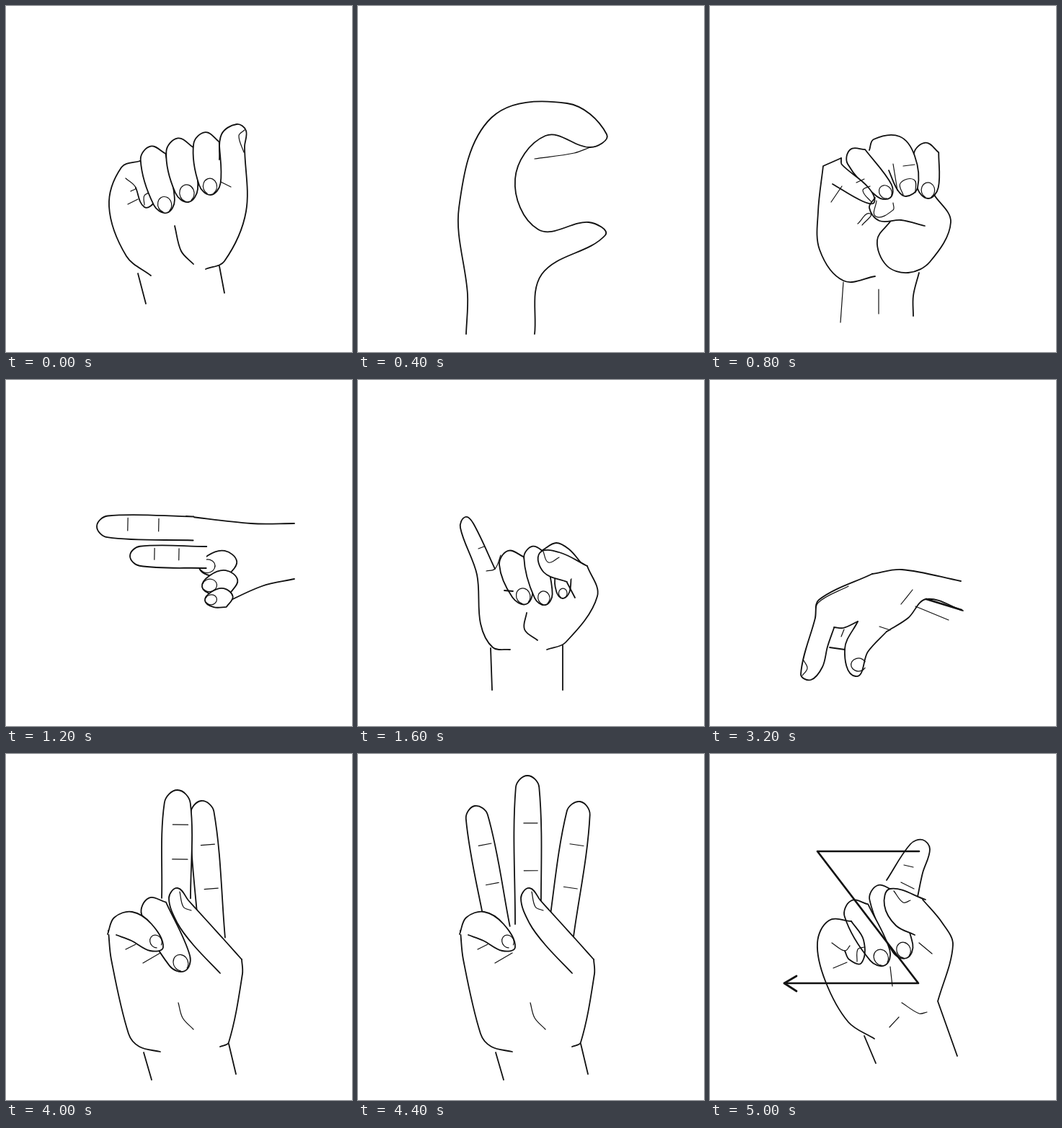
Animation of 480 by 480 pixels, one loop 5200 ms. Source, as an HTML page with a canvas:

```html
<!DOCTYPE html>
<html lang="en">
<head>
<meta charset="utf-8">
<title>Hand alphabet</title>
<style>
html, body { margin: 0; width: 100%; height: 100%; overflow: hidden; background: #fff; }
canvas { display: block; width: 100vw; height: 100vh; }
</style>
</head>
<body>
<canvas id="stage" width="480" height="480"></canvas>
<script>
const LETTER_MS = 200;
const ctx = document.getElementById('stage').getContext('2d');
ctx.lineCap = ctx.lineJoin = 'round';
ctx.strokeStyle = '#111';
ctx.fillStyle = '#fff';

// Smooth curve through the points; a repeated point makes a corner.
function curve(xy, width, filled) {
  const count = xy.length / 2;
  const at = i => {
    const k = Math.max(0, Math.min(count - 1, i)) * 2;
    return [xy[k], xy[k + 1]];
  };
  const handle = (i, reach) => {
    const [ax, ay] = at(i - 1), [bx, by] = at(i + 1), [x, y] = at(i);
    const scale = reach / (Math.hypot(bx - ax, by - ay) || 1);
    return [x + (bx - ax) * scale, y + (by - ay) * scale];
  };
  ctx.beginPath();
  ctx.moveTo(...at(0));
  for (let i = 0; i < count - 1; i++) {
    const [x0, y0] = at(i), [x1, y1] = at(i + 1);
    const reach = Math.hypot(x1 - x0, y1 - y0) / 3;
    ctx.bezierCurveTo(...handle(i, reach), ...handle(i + 1, -reach), x1, y1);
  }
  if (filled) ctx.fill();
  ctx.lineWidth = width;
  ctx.stroke();
}

const line = (...xy) => curve(xy, 1.8);
const thin = (...xy) => curve(xy, 1.2);
const bold = (...xy) => curve(xy, 2.7);
const shape = (...xy) => curve(xy, 1.8, true);

function nail(x, y, r, angle = 0) {
  ctx.beginPath();
  ctx.ellipse(x, y, r * 1.15, r, angle, .5, 5.8);
  ctx.lineWidth = 1.2;
  ctx.stroke();
}

// Run a drawing in coordinates along a finger: base at 0,0, tip at length,0.
function along(x0, y0, x1, y1, draw) {
  ctx.save();
  ctx.translate(x0, y0);
  ctx.rotate(Math.atan2(y1 - y0, x1 - x0));
  draw(Math.hypot(x1 - x0, y1 - y0));
  ctx.restore();
}

function finger(x0, y0, x1, y1, w) {
  along(x0, y0, x1, y1, length => {
    const r = w * .45, bend = length - r;
    shape(0, -w / 2, bend, -r, length, 0, bend, r, 0, w / 2);
    for (const t of [.36, .68]) thin(length * t, -w * .15, length * t, w * .38);
  });
}

function curl(x0, y0, x1, y1, w) {
  along(x0, y0, x1, y1, length => {
    const r = w * .45, h = w * .54, bend = length - r;
    shape(0, -h, bend, -r, length, 0, bend, r, 0, h, -r, 0, 0, -h);
    nail(length - w * .36, 0, w * .29);
  });
}

// Parts shared by several hands
function palm() {
  line(142,245, 146,285, 170,388, 185,406, 214,413);
  line(327,285, 328,305, 309,400, 297,406);
  thin(239,345, 245,366, 260,382);
  line(191,414, 202,452);
  line(309,402, 319,444);
}
function foldPinky() {
  shape(141,250, 150,227, 175,219, 202,236, 218,268, 200,273, 174,259, 153,251);
  nail(208,260, 8, 1);
  thin(166,271, 180,264);
  thin(190,290, 214,276);
}
function foldThumb() {
  shape(327,285, 302,257, 253,203, 238,186, 226,200, 238,235, 260,265, 297,304);
  thin(241,191, 246,212, 257,217);
}
function folded() {
  palm();
  curl(205,214, 248,301, 35);
  foldPinky();
  foldThumb();
}
function lowCurls() {
  curl(166,235, 195,285, 34);
  curl(196,217, 215,290, 35);
  curl(234,210, 243,292, 36);
}
function outThumb() {
  finger(300,314, 386,238, 35);
  line(286,250, 291,298);
}
function middleKnuckle() {
  shape(222,205, 230,184, 246,177, 268,198, 268,222);
}
function sideArm() {
  line(400,199, 340,199, 250,189);
  line(400,276, 355,286, 300,311);
  curl(306,254, 268,260, 32);
  curl(308,280, 272,287, 30);
  curl(304,302, 276,306, 24);
}
function reachArm() {
  line(348,279, 266,263, 225,269);
  line(245,349, 275,330, 300,304, 351,320);
  bold(300,304, 349,319);
  thin(265,311, 281,291);
  thin(285,314, 331,333);
}
function pinkyUp() {
  line(190,262, 160,199, 149,190, 142,205, 165,270, 170,338, 187,371, 211,374);
  thin(167,234, 175,231);
  thin(178,265, 190,262, 198,243);
  curl(213,251, 233,311, 33);
  curl(245,243, 260,312, 28);
  curl(285,272, 284,303, 20);
  line(203,292, 215,293);
  shape(318,258, 279,239, 252,240, 258,267, 290,280);
  thin(257,238, 264,253, 279,246);
  line(256,236, 275,226, 293,235, 309,253);
  line(290,281, 301,302);
  line(318,258, 332,300, 288,364, 262,374);
  line(234,323, 231,346, 249,361);
  line(184,372, 186,430);
  line(284,368, 284,430);
}
function draped() {
  line(117,408, 138,335, 177,261, 177,261, 222,237, 280,262, 288,295, 277,338);
  line(168,304, 178,294, 191,289, 228,325, 236,340, 254,342, 243,313, 217,275);
  nail(243,334, 8);
  thin(217,312, 228,307);
  line(217,275, 241,283, 235,289, 255,317);
  thin(241,281, 252,296, 256,312);
  line(247,279, 256,310, 257,343, 277,338);
  nail(267,335, 10);
  line(234,238, 262,226, 325,274, 322,318, 303,356, 278,346);
  nail(291,350, 9);
  thin(326,274, 324,308);
  thin(289,283, 291,303);
  thin(262,273, 272,272);
  thin(302,279, 313,277);
  line(168,376, 208,372, 221,361);
  line(252,375, 279,358);
  thin(214,374, 181,423);
  thin(256,373, 226,435);
}

const hands = {};

hands.A = () => {
  line(186,215, 203,232, 206,270, 192,279, 180,252);
  thin(192,276, 192,263, 204,257);
  thin(166,239, 180,252, 173,257);
  thin(169,275, 183,268);
  curl(204,209, 223,287, 33);
  curl(241,199, 253,272, 35);
  curl(278,190, 284,262, 33);
  line(296,213, 299,178, 320,164, 333,173, 331,195, 333,285, 303,354, 277,365);
  thin(331,172, 323,180, 330,203);
  thin(298,244, 312,251);
  line(186,215, 160,224, 143,278, 167,347, 201,374);
  line(234,305, 243,340, 260,358);
  line(183,371, 194,413);
  line(296,361, 303,398);
};

hands.B = () => {
  palm();
  finger(161,250, 154,110, 30);
  finger(194,240, 190,46, 34);
  finger(231,236, 234,20, 36);
  finger(268,240, 275,48, 35);
  line(285,238, 300,262, 327,285);
  shape(327,285, 285,285, 228,305, 222,326, 297,330);
};

hands.C = () => {
  line(150,455, 152,400, 140,280, 185,155, 290,135, 345,178, 322,196, 260,180,
    218,240, 250,310, 320,300, 343,318, 255,372, 245,455);
  thin(322,196, 300,204, 245,212);
};

hands.D = () => {
  finger(285,252, 282,42, 36);
  middleKnuckle();
  folded();
};

hands.E = () => {
  curl(203,209, 250,266, 29);
  shape(182,211, 183,220, 219,251, 228,272, 212,271, 170,247);
  thin(222,250, 212,256, 224,272);
  thin(183,250, 168,272);
  thin(203,245, 214,240);
  curl(300,204, 303,267, 32);
  shape(221,200, 227,185, 263,181, 284,208, 288,252, 272,264, 260,255, 248,228);
  thin(268,262, 264,246, 283,241, 285,259);
  thin(268,222, 284,220);
  thin(254,219, 260,256);
  line(229,266, 221,280, 235,298, 265,297, 298,305);
  thin(231,270, 230,292, 254,283, 254,273);
  line(250,299, 232,325, 245,360, 275,370, 305,355, 334,300, 311,262);
  thin(205,302, 222,288, 211,304);
  line(182,211, 157,222, 157,222, 150,285, 152,338, 185,381, 229,375);
  thin(185,383, 181,439);
  thin(234,393, 234,427);
  line(290,370, 282,402, 282,430);
};

hands.F = () => {
  palm();
  finger(161,248, 140,105, 30);
  finger(193,236, 180,55, 34);
  finger(229,236, 230,28, 36);
  shape(246,245, 272,213, 308,240, 290,272, 272,243, 258,255);
  shape(327,285, 300,258, 276,274, 297,300);
};

hands.G = () => {
  sideArm();
  finger(260,206, 126,203, 33);
  finger(278,246, 172,244, 30);
};

hands.H = () => {
  sideArm();
  finger(262,236, 116,232, 31);
  finger(260,206, 105,201, 32);
  shape(318,252, 270,232, 238,249, 295,268);
};

hands.I = pinkyUp;

hands.J = () => {
  pinkyUp();
  bold(148,178, 148,330, 126,372, 105,342);
  bold(104,360, 105,342, 105,342, 119,353);
};

hands.K = () => {
  finger(283,252, 297,30, 36);
  finger(240,228, 220,92, 34);
  folded();
};

hands.L = () => {
  palm();
  finger(268,252, 268,20, 36);
  lowCurls();
  outThumb();
};

hands.M = () => {
  draped();
  line(281,237, 305,234, 361,276, 342,333, 316,337);
  nail(329,332, 9);
  thin(330,277, 345,277);
  thin(394,278, 398,278);
};

hands.N = draped;

hands.O = () => {
  line(152,440, 142,300, 190,185, 285,185, 338,250, 315,277, 292,270, 258,300);
  line(315,277, 312,318, 255,362, 245,440);
  line(270,282, 270,232, 315,277);
  thin(190,185, 252,225, 262,252);
};

hands.P = () => {
  reachArm();
  finger(228,322, 188,420, 34);
  finger(225,288, 78,298, 34);
  shape(262,341, 212,322, 186,324, 245,349);
};

hands.Q = () => {
  reachArm();
  line(225,269, 151,305, 146,330, 126,408, 140,416, 156,398, 163,370, 172,344);
  thin(192,286, 150,309, 146,330);
  thin(128,410, 135,400, 130,389);
  line(166,371, 187,374);
  line(172,343, 185,344, 205,335);
  thin(186,346, 182,356);
  line(205,335, 187,373, 202,411, 219,377, 245,349);
  nail(206,395, 9);
  thin(235,342, 250,347);
};

hands.R = () => {
  ctx.translate(0, -10);
  finger(238,232, 278,88, 34);
  finger(285,254, 250,82, 34);
  folded();
};

hands.S = () => {
  ctx.translate(0, -11);
  palm();
  lowCurls();
  curl(271,216, 272,286, 36);
  line(285,216, 310,242, 327,285);
  shape(327,285, 300,262, 235,300, 230,326, 297,310);
};

hands.T = () => {
  palm();
  lowCurls();
  shape(327,285, 290,225, 260,184, 252,220, 285,290);
  curl(283,220, 277,284, 34);
  line(298,218, 316,250, 327,285);
};

hands.U = () => {
  finger(286,256, 271,65, 36);
  finger(236,200, 238,50, 40);
  folded();
};

hands.V = () => {
  finger(238,228, 203,48, 35);
  finger(283,252, 306,52, 36);
  folded();
};

hands.W = () => {
  palm();
  finger(194,242, 162,72, 34);
  finger(236,236, 235,30, 36);
  finger(281,252, 308,66, 36);
  foldPinky();
  foldThumb();
};

hands.X = () => {
  shape(250,215, 262,135, 303,135, 288,175, 305,258);
  middleKnuckle();
  folded();
};

hands.Y = () => {
  ctx.translate(0, -23);
  palm();
  finger(161,260, 110,146, 32);
  curl(193,217, 210,290, 35);
  curl(231,210, 241,292, 36);
  curl(268,215, 271,286, 35);
  outThumb();
};

hands.Z = () => {
  line(245,175, 278,125, 295,119, 305,132, 295,165, 288,198);
  thin(269,154, 282,157);
  thin(265,178, 283,187);
  curl(238,196, 273,283, 33);
  curl(203,217, 243,293, 34);
  shape(299,202, 250,187, 242,210, 258,238, 284,251);
  thin(255,190, 268,206, 278,203);
  line(196,232, 213,258, 210,290, 193,285, 187,273);
  thin(204,288, 205,271, 214,268);
  thin(169,262, 187,273, 194,266);
  thin(171,297, 190,289);
  line(196,232, 165,231, 149,262, 160,315, 192,372, 228,395);
  line(295,202, 322,234, 337,265, 316,343, 316,343, 343,419);
  thin(250,295, 253,322);
  thin(290,262, 308,277);
  thin(266,345, 290,360, 301,358);
  thin(249,379, 262,365);
  line(214,391, 230,429);
  bold(290,135, 149,135, 149,135, 289,318, 289,318, 103,318);
  bold(120,308, 103,318, 103,318, 120,329);
};

const sequence = Object.values(hands);

function render(now) {
  ctx.setTransform(1, 0, 0, 1, 0, 0);
  ctx.fillRect(0, 0, 480, 480);
  sequence[Math.floor(now / LETTER_MS) % sequence.length]();
  requestAnimationFrame(() => render(performance.now()));
}
render(0);
</script>
</body>
</html>
```
